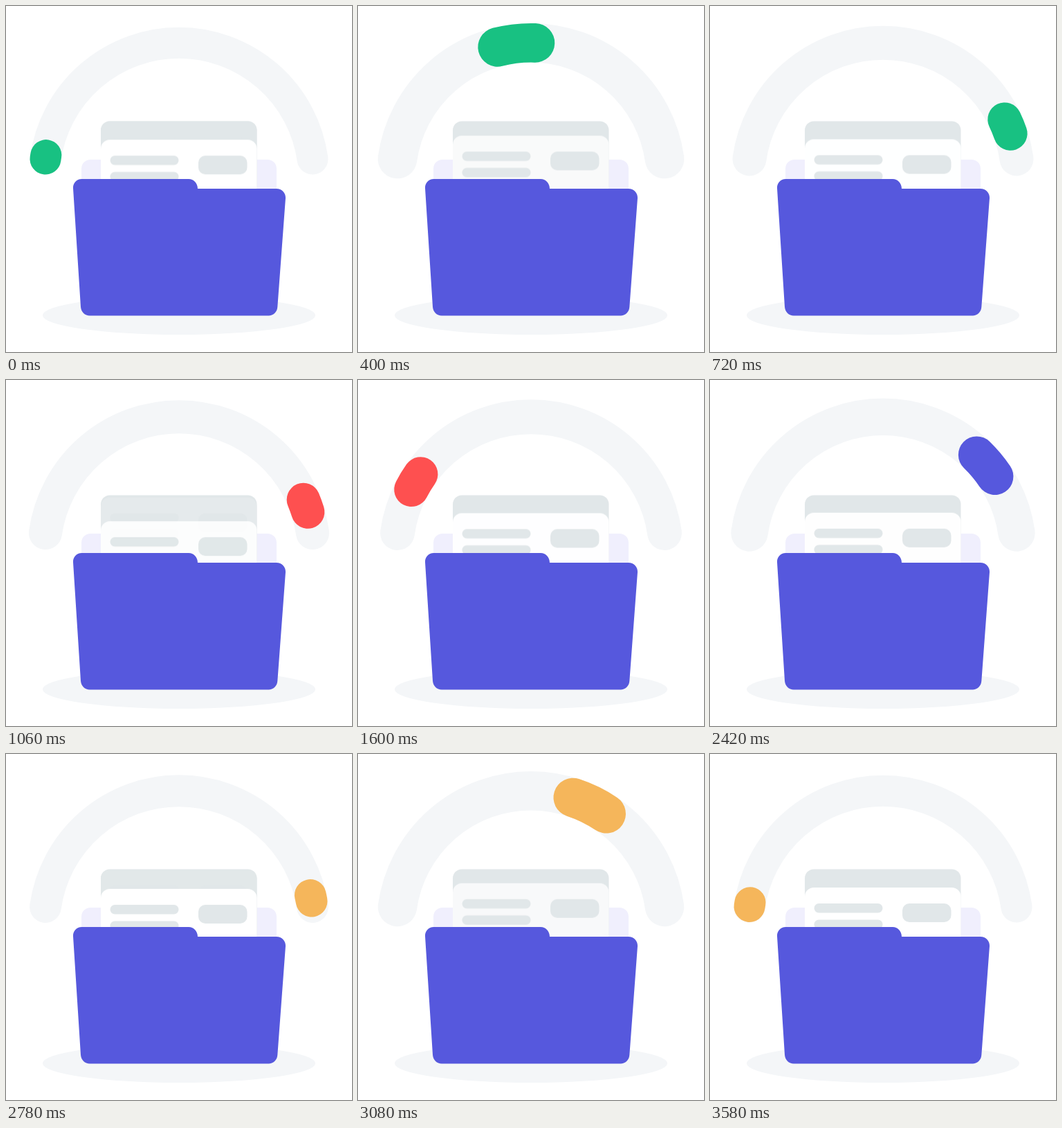
Recreate the animation shown at these times as an HTML page. Size 500x500 px, loop 3.6 s.

```html
<!DOCTYPE html>
<html lang="en">
<head>
<meta charset="utf-8">
<title>Folder loader</title>
<style>
  html, body { margin: 0; width: 100%; height: 100%; overflow: hidden; background: #fff; }
  svg { display: block; width: 100vw; height: 100vh; }
  .arc { fill: none; stroke-linecap: round; stroke-width: 45px; }
  #track { stroke: #f4f6f8; }
  #dash { stroke: #18c182; stroke-dasharray: 5.5px 700px; }
  .bars, #rear { fill: #e1e7e9; }
</style>
</head>
<body>
<svg viewBox="0 0 500 500">
  <defs>
    <rect id="sheet" x="137" width="225.5" height="160" rx="13"/>
    <g id="bars" class="bars">
      <rect x="150.5" y="23" width="99" height="13.5" rx="6.75"/>
      <rect x="150.5" y="46.5" width="99" height="13.5" rx="6.75"/>
      <rect x="278" y="23" width="70.5" height="27" rx="10"/>
    </g>
  </defs>

  <path id="track" class="arc" d="M57 221A194.9 194.9 0 0 1 443 221"/>
  <path id="dash" class="arc" d="M57 221A194.9 194.9 0 0 1 443 221"/>

  <ellipse cx="250" cy="447" rx="197" ry="28" fill="#f4f6f8"/>
  <rect x="109" y="222" width="282" height="200" rx="13" fill="#f0effd"/>

  <use id="rear" href="#sheet" y="166.5"/>
  <g id="next"><use id="tint" href="#sheet"/><use href="#bars"/></g>
  <g id="front"><use href="#sheet" fill="#fff"/><use href="#bars"/></g>

  <path fill="#5658dd" d="M97 263.5C96.5 256 102 250 109.5 250H264C271 250 277 256 277 264H391
    C398.5 264 404.4 270 404 277.5L392.3 435C392 442 386 447.5 379.5 447.5H121
    C114 447.5 108.6 442 108 435Z"/>
</svg>
<script>
  const PASS = 900;
  const COLORS = ['#18c182', '#fe5050', '#5658dd', '#f5b65b'];
  const SLIDE = 'cubic-bezier(.4, 0, .05, 1)';
  const SWING = 'cubic-bezier(.35, 0, .65, 1)';
  const running = [];

  function loop(id, frames, options) {
    const el = document.getElementById(id);
    running.push(el.animate(frames, { duration: PASS, iterations: Infinity, ...options }));
  }

  // Grow to the middle of a pass and shrink back
  function pulse(id, prop, rest, peak) {
    const easing = 'ease-in-out';
    loop(id, [{ [prop]: rest, easing }, { [prop]: peak, easing }, { [prop]: rest }]);
  }

  const shift = y => `translate(0px, ${y}px)`;

  pulse('track', 'strokeWidth', '45px', '57px');
  pulse('dash', 'strokeWidth', '45px', '57px');
  pulse('dash', 'strokeDasharray', '5.5px 700px', '56px 700px');
  loop('dash', { strokeDashoffset: ['0px', '-552px'] }, { easing: SWING, direction: 'alternate' });

  // Each pass holds one colour, then switches at once
  loop('dash', [...COLORS, COLORS[0]].map((stroke, i) => ({
    stroke, offset: i / COLORS.length, easing: 'step-end'
  })), { duration: PASS * COLORS.length });

  loop('front', { transform: [shift(193), shift(280)], opacity: [1, 0] }, { easing: SLIDE });
  loop('next', { transform: [shift(166.5), shift(193)] }, { easing: SLIDE });
  loop('tint', { fill: ['#e1e7e9', '#ffffff'] }, { easing: SLIDE });

  const start = document.timeline.currentTime ?? performance.now();
  running.forEach(a => { a.startTime = start; });
</script>
</body>
</html>
```
